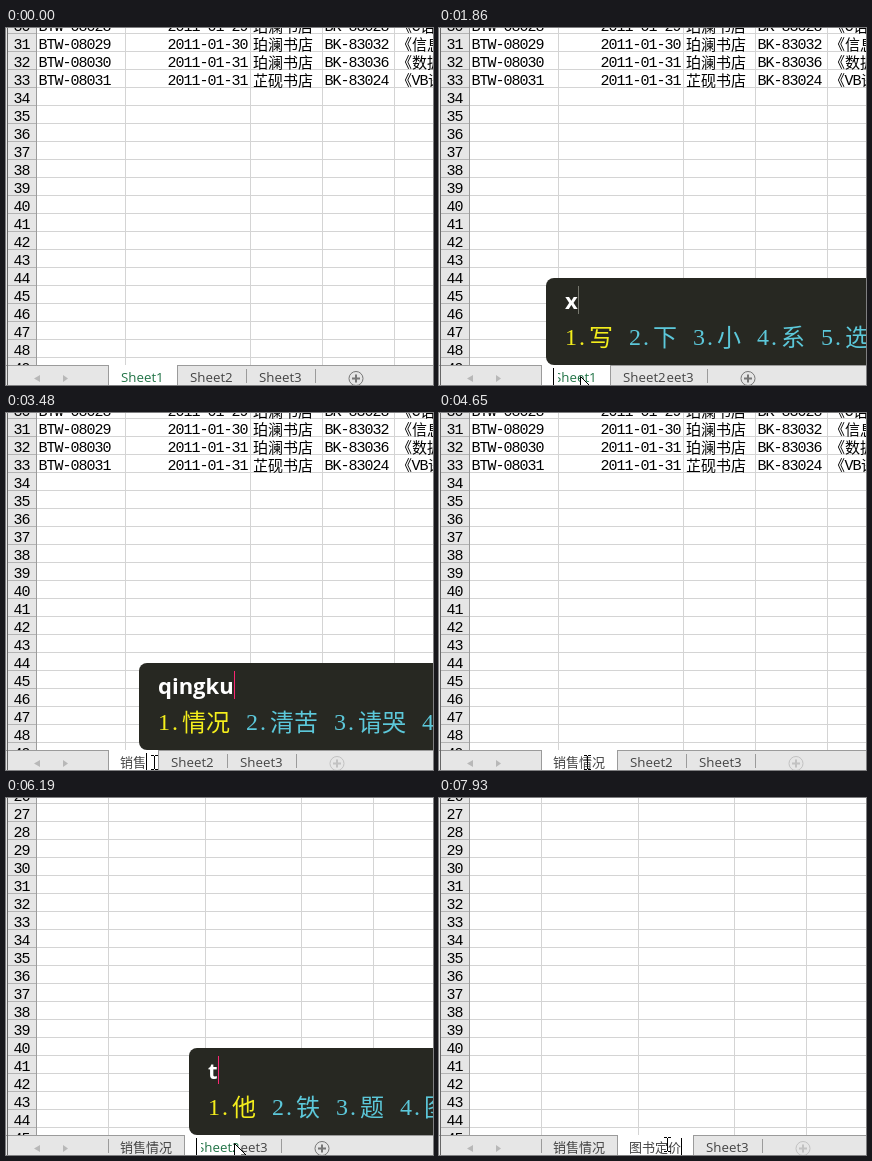
Write an HTML page with a canvas that moves like this. It is 427x357 px and loops after 8000 ms.

```html
<!DOCTYPE html>
<html lang="zh">
<head>
<meta charset="utf-8">
<title>Renaming sheets</title>
<style>
html, body { margin: 0; width: 100%; height: 100%; overflow: hidden; background: #fff; }
canvas { display: block; }
</style>
</head>
<body>
<canvas id="stage" width="427" height="357"></canvas>
<script>
const W = 427, H = 357, LOOP = 8000;
const g = document.getElementById('stage').getContext('2d');
const CJK = '"Noto Sans CJK SC", "Noto Sans CJK", sans-serif';
const CELL = '15px "Liberation Mono", monospace';
const CELL_CJK = '300 15px ' + CJK;
const TAB = '13.3px "Open Sans", "Noto Sans", sans-serif';
const TAB_CJK = '13px ' + CJK;
const TYPED = 'bold 22px "Open Sans", "Noto Sans", sans-serif';
const GREEN = '#217346', DARK = '#444', BAR = '#e6e6e6', EDGE = '#9b9b9b';

const SHEETS = [
  { first: 30, cols: [119, 244, 316, 388] },
  { first: 26, cols: [102, 199, 295, 367] }
];
const ROWS = [
  ['BTW-08028', '2011-01-29', '珀澜书店', 'BK-83028', '《C语言'],
  ['BTW-08029', '2011-01-30', '珀澜书店', 'BK-83032', '《信息'],
  ['BTW-08030', '2011-01-31', '珀澜书店', 'BK-83036', '《数据'],
  ['BTW-08031', '2011-01-31', '芷砚书店', 'BK-83024', '《VB语']
];
const ROW_X = [33, 162, 247, 319, 391];

function box(x, y, w, h, color) {
  g.fillStyle = color;
  g.fillRect(x, y, w, h);
}

function write(text, x, y, font, color) {
  g.font = font;
  g.fillStyle = color;
  g.fillText(text, x, y);
}

const isWide = s => s.charCodeAt(0) > 255;

function cell(text, x, mid) {
  for (const c of text) {
    const wide = isWide(c);
    write(c, wide ? x : x - 0.5, mid + (wide ? 6 : 5), wide ? CELL_CJK : CELL, '#000');
    x += wide ? 15 : 8;
  }
}

function drawGrid(index) {
  const { first, cols } = SHEETS[index];
  g.save();
  g.beginPath();
  g.rect(0, 0, W, 337);
  g.clip();
  box(0, 0, 30, 337, BAR);
  for (let y = 5; y < 337; y += 18) {
    box(2, y, 28, 1, '#b4b4b4');
    box(31, y, W, 1, '#d4d4d4');
  }
  for (const x of cols) box(x, 0, 1, 337, '#d4d4d4');
  box(30, 0, 1, 337, EDGE);
  for (let i = 0; i < 20; i++) {
    const mid = 18 * i - 2;
    cell(String(first + i), 8, mid);
    if (index === 0 && ROWS[i]) ROWS[i].forEach((text, c) => cell(text, ROW_X[c], mid));
  }
  g.restore();
}

const tabWidth = name => !name ? 28 : isWide(name) ? 24 + 13 * name.length : 69;

function drawPlus(x, faint) {
  g.strokeStyle = faint ? '#c2c2c2' : '#777';
  g.lineWidth = 1;
  g.beginPath();
  g.arc(x, 350.5, 7, 0, 7);
  g.stroke();
  box(x - 4, 349.5, 8, 2, g.strokeStyle);
  box(x - 1, 346.5, 2, 8, g.strokeStyle);
}

function drawTabs(s, label, faint) {
  const names = s.names.slice();
  names[s.active] = label;
  box(0, 337, W, 20, BAR);
  box(0, 337, W, 1, EDGE);
  [[28, 34], [62, 57]].forEach(([tip, base]) => {
    g.fillStyle = '#b8b8b8';
    g.beginPath();
    g.moveTo(tip, 350.5);
    g.lineTo(base, 347);
    g.lineTo(base, 354);
    g.fill();
  });
  let x = 102;
  if (s.active > 0) box(x, 341, 1, 14, EDGE);
  names.forEach((name, i) => {
    const w = tabWidth(name), on = i === s.active;
    if (on) {
      box(x, 337, w + 1, 20, EDGE);
      box(x + 1, 337, w - 1, 20, '#fff');
      if (s.selected) box(x + 12, 341, w - 25, 16, '#c6c6c6');
    } else if (i + 1 !== s.active) {
      box(x + w, 341, 1, 14, EDGE);
    }
    const wide = name && isWide(name);
    write(name, x + (wide ? 12 : 13), 354, wide ? TAB_CJK : TAB, on ? s.ink : DARK);
    x += w;
  });
  drawPlus(x + 41, faint);
}

function drawBar(s) {
  const parts = s.parts || [[0, W, s.names[s.active]]];
  for (const [a, b, label] of parts) {
    g.save();
    g.beginPath();
    g.rect(a, 337, b - a, 20);
    g.clip();
    drawTabs(s, label, s.faint);
    g.restore();
  }
  if (s.veil) box(s.caret, 339, 5, 18, '#fff');
  if (s.caret) box(s.caret, 340, 1, 17, s.dim ? '#888' : '#000');
  box(1, 0, 1, H, '#666');
}

function drawIme({ x, text, picks }, t) {
  const list = picks.split(' ');
  const pitch = list[0].length * 24 + 40;
  g.fillStyle = '#272822';
  g.beginPath();
  g.roundRect(x, 250, 24 + pitch * list.length, 87, 8);
  g.fill();
  const left = x + 20;
  write(text, left - 1, 281, TYPED, '#fff');
  const end = Math.round(left + g.measureText(text).width - 0.5);
  box(end, 258, 1, 28, Math.floor(t / 500) % 2 ? '#77786f' : '#f92672');
  list.forEach((word, i) => {
    const px = left + i * pitch, color = i ? '#5cc8da' : '#f4ee1c';
    const serif = '24px "Liberation Serif", serif';
    write(i + 1, px - 1, 317, serif, color);
    write('.', px + 13, 317, serif, color);
    write(word, px + 23, 318, '300 24px ' + CJK, color);
  });
}

function drawPointer({ x, y, shape }) {
  g.lineWidth = 1;
  g.strokeStyle = '#000';
  g.fillStyle = '#fff';
  g.beginPath();
  if (shape === 'arrow') {
    const pts = [0, 0, 0, 16, 4, 12.5, 6.5, 18, 9, 17, 6.5, 11.5, 11.5, 11.5];
    for (let i = 0; i < pts.length; i += 2) g.lineTo(x + 0.5 + pts[i], y + 0.5 + pts[i + 1]);
    g.closePath();
    g.fill();
    g.stroke();
  } else if (shape === 'beam') {
    box(x, y - 6, 1, 13, '#000');
    for (const dy of [-7, 7]) {
      box(x - 3, y + dy, 3, 1, '#000');
      box(x + 1, y + dy, 3, 1, '#000');
    }
  } else {
    const a = 2.5, b = 8.5;
    const pts = [-a, -b, a, -b, a, -a, b, -a, b, a, a, a, a, b, -a, b, -a, a, -b, a, -b, -a, -a, -a];
    for (let i = 0; i < pts.length; i += 2) g.lineTo(x + pts[i], y + pts[i + 1]);
    g.closePath();
    g.fill();
    g.stroke();
  }
}

// Each entry: time, then the properties that change.
const EVENTS = [
  [1010, { selected: true }],
  [1090, { caret: 157 }],
  [1470, { dim: true }],
  [1550, { caret: 0, dim: false }],
  [1860, { selected: false, caret: 114, veil: true, parts: [[0, 228, 'Sheet1'], [228, W, '']] }],
  [1940, { names: ['', 'Sheet2', 'Sheet3'], parts: null, veil: false }],
  [2730, { names: ['销售', 'Sheet2', 'Sheet3'], ink: DARK, faint: true, caret: 140,
    parts: [[0, 142, '销售'], [142, 292, ''], [292, W, '销售']] }],
  [2790, { parts: null }],
  [3790, { names: ['销售情况', 'Sheet2', 'Sheet3'], caret: 166 }],
  [4260, { dim: true }],
  [4340, { caret: 0, dim: false }],
  [5030, { ink: GREEN, faint: false }],
  [5260, { sheet: 1, active: 1 }],
  [5500, { selected: true }],
  [5580, { caret: 233 }],
  [5810, { dim: true }],
  [5960, { caret: 0, dim: false }],
  [6190, { selected: false, caret: 190, veil: true, parts: [[0, 234, 'Sheet2'], [234, W, '']] }],
  [6280, { names: ['销售情况', '', 'Sheet3'], parts: null, veil: false }],
  [6900, { names: ['销售情况', '图书', 'Sheet3'], ink: DARK, faint: true, caret: 216,
    parts: [[0, 217, '图书'], [217, 300, ''], [300, W, '图书']] }],
  [6990, { parts: null }],
  [7630, { dim: true }],
  [7700, { caret: 0, dim: false }],
  [7930, { names: ['销售情况', '图书定价', 'Sheet3'], caret: 242 }]
];

// Composition sessions: left edge, end time, then time, typed letters, choices.
const SESSIONS = [
  [107, 2730, [
    [1860, 'x', '写 下 小 系 选'], [2020, 'xi', '系 下 洗 西 喜'],
    [2100, 'xia', '下 夏 吓 虾 瞎'], [2180, 'xiao', '小 笑 校 销 效'],
    [2250, 'xiaos', '小时 销售 小说 消失'], [2330, 'xiaosh', '小时 销售 小说 消失'],
    [2410, 'xiaosho', '销售 小手 消瘦 消受'], [2560, 'xiaoshou', '销售 消瘦 小手 消受']]],
  [133, 3790, [
    [2880, 'q', '去 请 前 起 钱'], [3110, 'qi', '起 其 期 气 钱'],
    [3250, 'qin', '亲 琴 勤 侵 禽'], [3330, 'qing', '请 情 清 轻 晴'],
    [3400, 'qingk', '情况 请看 晴空 清空'], [3480, 'qingku', '情况 清苦 请哭 晴空']]],
  [183, 6900, [
    [6190, 't', '他 铁 题 图 天'], [6430, 'tu', '图 土 突 吐 涂'],
    [6520, 'tus', '图书 徒手 吐丝 土色'], [6600, 'tush', '图书 徒手 图示 吐舌'],
    [6670, 'tushu', '图书 涂书 土鼠 图树']]],
  [209, 7930, [
    [7150, 'd', '的 到 大 都 点'], [7230, 'di', '第 地 低 底 弟'],
    [7390, 'din', '定 顶 订 丁 盯'], [7460, 'ding', '定 顶 订 丁 盯'],
    [7630, 'dingj', '定价 顶级 定金 定居'], [7700, 'dingji', '定价 顶级 定级 定计']]]
];

// Pointer moves: start, end, number of steps, from, to, shape.
const MOVES = [
  [150, 940, 11, [398, 2], [142, 348], 'arrow'],
  [1250, 1550, 5, [146, 348], [141, 348], 'arrow'],
  [2730, 2790, 2, [141, 348], [142, 350], 'arrow'],
  [3250, 3480, 4, [146, 349], [148, 349], 'beam'],
  [4650, 4880, 4, [148, 349], [232, 347], 'arrow'],
  [5030, 5120, 2, [234, 346], [238, 346], 'arrow'],
  [5260, 5580, 5, [236, 346], [228, 345], 'arrow'],
  [6900, 6990, 2, [227, 345], [227, 345], 'arrow'],
  [7700, 7930, 2, [228, 346], [228, 346], 'beam']
];

function stateAt(t) {
  const s = { sheet: 0, active: 0, names: ['Sheet1', 'Sheet2', 'Sheet3'], ink: GREEN };
  for (const [time, change] of EVENTS) if (t >= time) Object.assign(s, change);
  return s;
}

function imeAt(t) {
  for (const [x, end, keys] of SESSIONS) {
    if (t < keys[0][0] || t >= end) continue;
    const [, text, picks] = keys.filter(k => t >= k[0]).pop();
    return { x, text, picks };
  }
}

function pointerAt(t) {
  const move = MOVES.filter(m => t >= m[0]).pop();
  if (!move) return;
  const [start, end, steps, from, to, shape] = move;
  const n = steps - 1;
  const p = Math.min(1, Math.floor((t - start) / (end - start) * n + 0.05) / n);
  const x = Math.round(from[0] + (to[0] - from[0]) * p);
  const y = Math.round(from[1] + (to[1] - from[1]) * p);
  if (y < 337) return { x, y, shape: 'cross' };
  return { x, y, shape: start === 4650 && p === 0 ? 'beam' : shape };
}

function draw(t) {
  const s = stateAt(t), ime = imeAt(t), pointer = pointerAt(t);
  box(0, 0, W, H, '#fff');
  drawGrid(s.sheet);
  drawBar(s);
  if (ime) drawIme(ime, t);
  if (pointer) drawPointer(pointer);
}

const begin = performance.now();
function tick() {
  draw((performance.now() - begin) % LOOP);
  requestAnimationFrame(tick);
}
tick();
</script>
</body>
</html>
```
